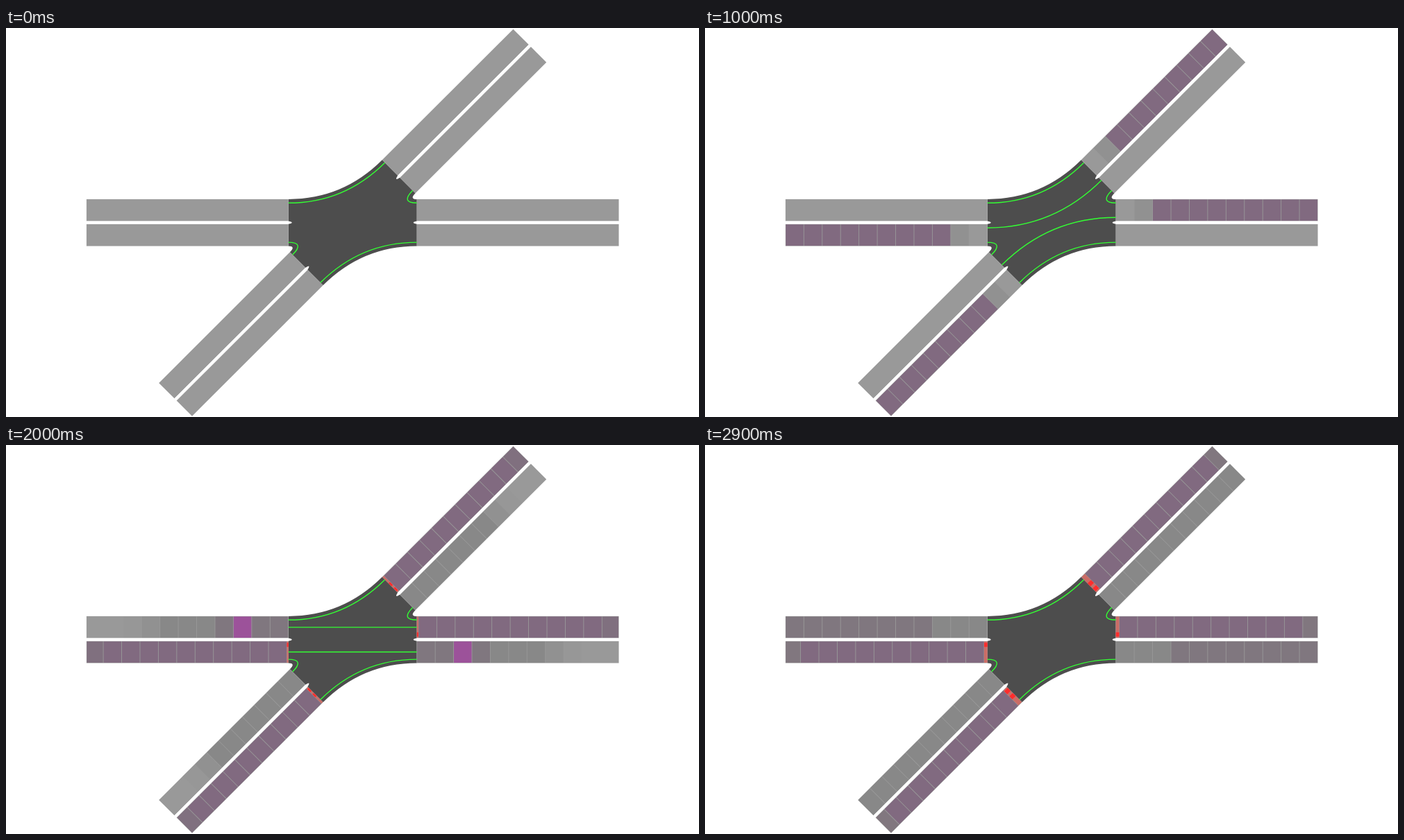
An HTML page with a canvas that plays this animation: 998x561 px, repeating every 3000 ms.

```html
<!DOCTYPE html>
<html lang="en">
<head>
<meta charset="utf-8">
<title>Signalled junction</title>
<style>
  html, body { margin: 0; width: 100%; height: 100%; overflow: hidden; background: #fff; }
  canvas { display: block; }
</style>
</head>
<body>
<canvas id="stage" width="998" height="561"></canvas>
<script>
const ctx = document.getElementById('stage').getContext('2d');

const LOOP = 3000, STEP = 100, CELLS = 11;
const CENTER = { x: 499.2, y: 280.7 };
const EDGE = 33.8, GAP = 2.1;                       // lane limits measured from the road axis
const TURN = { left: 7.5, straight: 17.8, right: 28.4 };
const COLOR = {
  road: '#999999', junction: '#4d4d4d', path: '#33ff33',
  full: '#816a80', tail: '#80707f', thinTail: '#81777f',
  front: '#919191', faint: '#979797', light: '#888888',
  medium: '#80777f', pulse: '#9c529a',
  queue: '#cb6c66', blocked: '#ff2d2d'
};

const flat = { angle: 0, near: 92.5, far: 383.3, flat: true };
const slant = { angle: -Math.PI / 4, near: 94, far: 360.8, flat: false };

// Point on the junction border; along = outward distance, across > 0 is the outgoing side.
function port(road, across, flip = 1) {
  const c = Math.cos(road.angle), s = Math.sin(road.angle), u = road.near;
  return { x: flip * (u * c - across * s), y: flip * (u * s + across * c) };
}

// The slanted road runs along x + y = const, the flat one along y = const.
const corner = (h, d) => ({ x: d.x + d.y - h.y, y: h.y });

function curveTo(from, to, fromFlat) {
  const k = fromFlat ? corner(from, to) : corner(to, from);
  ctx.quadraticCurveTo(k.x, k.y, to.x, to.y);
}

function turnPath(h, d) {
  ctx.beginPath();
  ctx.moveTo(h.x, h.y);
  curveTo(h, d, true);
  ctx.stroke();
}

function drawJunction() {
  ctx.fillStyle = COLOR.junction;
  ctx.beginPath();
  for (const flip of [1, -1]) {
    const west = port(flat, EDGE, -flip), top = port(slant, -EDGE, flip);
    const side = port(slant, EDGE, flip), east = port(flat, -EDGE, flip);
    ctx.lineTo(west.x, west.y);
    curveTo(west, top, true);
    ctx.lineTo(side.x, side.y);
    curveTo(side, east, false);
  }
  ctx.closePath();
  ctx.fill();
}

function drawPaths(n) {
  ctx.strokeStyle = COLOR.path;
  ctx.lineWidth = 1.4;
  for (const flip of [1, -1]) {
    turnPath(port(flat, TURN.right, -flip), port(slant, -TURN.right, flip));
    turnPath(port(flat, -TURN.right, flip), port(slant, TURN.right, flip));
    if (n >= 1 && n <= 10) {
      turnPath(port(flat, -TURN.left, -flip), port(slant, TURN.left, flip));
    }
    if (n >= 16 && n <= 25) {
      const a = port(flat, -TURN.straight, flip), b = port(flat, TURN.straight, -flip);
      ctx.beginPath();
      ctx.moveTo(a.x, a.y);
      ctx.lineTo(b.x, b.y);
      ctx.stroke();
    }
  }
}

function cell(u0, u1, v0, color) {
  ctx.fillStyle = color;
  ctx.fillRect(u0 + 0.45, v0 + 0.5, u1 - u0 - 0.9, EDGE - GAP - 1);
}

function queueLength(road, n) {
  const base = 0.28 * Math.max(0, n - 11);
  return road.flat ? base : base + 0.18 * Math.max(0, n - 16);
}

function drawIncoming(road, n) {
  const size = (road.far - road.near) / CELLS, queue = queueLength(road, n);
  for (let i = 0; i < Math.min(CELLS, n + 1); i++) {
    if (n === 0) break;
    const outer = i ? road.far - i * size + queue : road.far;
    const inner = road.far - (i + 1) * size + queue;
    let color = i === n ? COLOR.front : COLOR.full;
    if (i === 0 && n >= 12) color = n >= 25 ? COLOR.thinTail : COLOR.tail;
    cell(inner, outer, -EDGE, color);
  }
  if (!queue) return;
  ctx.fillStyle = COLOR.queue;
  ctx.fillRect(road.near, -EDGE + 0.5, queue, EDGE - GAP - 1);
  ctx.fillStyle = COLOR.blocked;
  const stopped = road.flat ? [TURN.left] : [TURN.left, TURN.straight];
  for (const v of stopped) ctx.fillRect(road.near, -v - 3, queue, 6);
}

// Colour of traffic that left the junction at the given step.
function departed(step, isFlat) {
  if (step < 11) return null;
  if (step === 11) return COLOR.faint;
  if (step === 12) return COLOR.front;
  if (!isFlat || step < 16 || step > 25) return COLOR.light;
  return step === 17 ? COLOR.pulse : COLOR.medium;
}

function drawOutgoing(road, n) {
  const size = (road.far - road.near) / CELLS;
  for (let i = 0; i < CELLS; i++) {
    const color = departed(n - i, road.flat);
    if (color) cell(road.near + i * size, road.near + (i + 1) * size, GAP, color);
  }
}

function drawRoad(road, n) {
  const length = road.far - road.near;
  ctx.fillStyle = COLOR.road;
  ctx.fillRect(road.near, -EDGE, length, EDGE - GAP);
  ctx.fillRect(road.near, GAP, length, EDGE - GAP);
  drawIncoming(road, n);
  drawOutgoing(road, n);
  ctx.fillStyle = '#fff';
  ctx.beginPath();
  ctx.moveTo(road.far, -GAP);
  ctx.lineTo(road.near, -GAP);
  ctx.quadraticCurveTo(road.near - 10, 0, road.near, GAP);
  ctx.lineTo(road.far, GAP);
  ctx.fill();
}

function draw(time) {
  const n = Math.max(0, Math.floor((time % LOOP) / STEP) - 1);
  ctx.setTransform(1, 0, 0, 1, 0, 0);
  ctx.fillStyle = '#fff';
  ctx.fillRect(0, 0, 998, 561);
  ctx.translate(CENTER.x, CENTER.y);
  drawJunction();
  for (const road of [flat, slant]) {
    for (const turn of [0, Math.PI]) {
      ctx.save();
      ctx.rotate(road.angle + turn);
      drawRoad(road, n);
      ctx.restore();
    }
  }
  drawPaths(n);
}

function tick() {
  draw(performance.now());
  requestAnimationFrame(tick);
}
tick();
</script>
</body>
</html>
```
